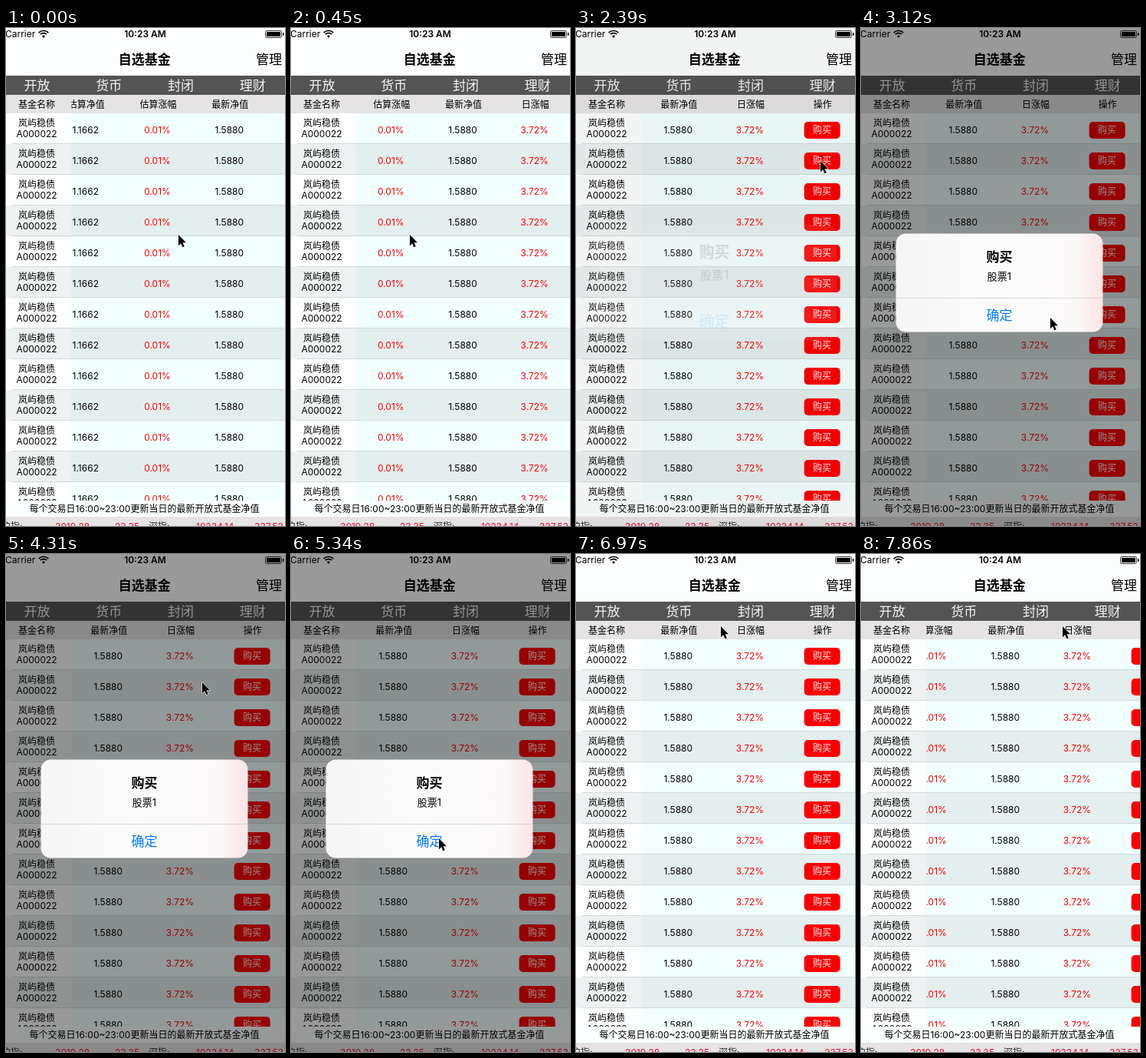
These frames come from a looping animation (364 px wide and 648 px high, 8000 ms). An HTML page:

```html
<!DOCTYPE html>
<html lang="zh-CN">
<head>
<meta charset="utf-8">
<title>自选基金</title>
<style>
  html, body { margin: 0; width: 100%; height: 100%; overflow: hidden; background: #fcfefd; }
  svg { display: block; width: 364px; height: 648px; }
  text { font-family: Inter, "Noto Sans CJK SC", "Noto Sans CJK", sans-serif; }
</style>
</head>
<body>
<svg id="stage" viewBox="0 0 364 648"></svg>
<script>
const LOOP = 8000;
const ROWS = 13, ROW_H = 40, TOP = 111, BOTTOM = 615, SPLIT = 85;
const COL = 93.75;
const colX = i => 40.4 + i * COL;

const rect = (x, y, w, h, fill, extra = '') =>
  `<rect x="${x}" y="${y}" width="${w}" height="${h}" fill="${fill}" ${extra}/>`;

// y is the optical middle of the line
const label = (str, x, y, { size = 12, fill = '#000', anchor = 'middle', weight = 400, id = '' } = {}) =>
  `<text ${id && `id="${id}"`} x="${x}" y="${y + size * 0.37}" font-size="${size}" fill="${fill}" ` +
  `text-anchor="${anchor}" font-weight="${weight}">${str}</text>`;

const rows = draw => Array.from({ length: ROWS }, (_, i) => draw(TOP + i * ROW_H, i % 2)).join('');

function statusBar() {
  const wifi = [3, 6.2, 9.4].map((r, i) => {
    const d = r * 0.68;
    return i
      ? `<path d="M${49 - d} ${12.4 - d}A${r} ${r} 0 0 1 ${49 + d} ${12.4 - d}" fill="none" stroke="#000" stroke-width="1.7"/>`
      : `<path d="M49 13L${49 - d} ${12.4 - d}A${r} ${r} 0 0 1 ${49 + d} ${12.4 - d}Z"/>`;
  }).join('');
  return label('Carrier', -1, 8, { anchor: 'start' }) + wifi +
    label('10:23 AM', 181.5, 8, { weight: 600, id: 'clock' }) +
    rect(338.5, 3.5, 21, 9, 'none', 'rx="2" stroke="#000" stroke-width=".8"') +
    rect(340, 5, 18, 6, '#000', 'rx=".8"') +
    rect(361, 6, 1.5, 4, '#000', 'rx=".7"');
}

function page() {
  const tabs = ['开放', '货币', '封闭', '理财']
    .map((s, i) => label(s, colX(i), 75, { size: 17, fill: '#f4f4f4' })).join('');
  const heads = ['估算净值', '估算涨幅', '最新净值', '日涨幅', '操作']
    .map((s, i) => label(s, colX(i - 1), 100)).join('');
  const cells = rows(y =>
    [['1.1662'], ['0.01%', '#f00'], ['1.5880'], ['3.72%', '#f00']]
      .map(([s, fill]) => [s, fill || '#000'])
      .map(([s, fill], i) => label(s, colX(i - 1) - 0.9, y + 22, { fill })).join('') +
    rect(colX(3) - 24, y + 11, 47, 22, '#fb0000', 'rx="5"') +
    label('购买', colX(3) - 0.6, y + 22, { fill: '#fff0f0' }));

  const ticker = [['沪指:', -6], ['3019.28', 64, 1], ['23.35', 142, 1],
    ['深指:', 186], ['10234.14', 248, 1], ['337.53', 324, 1]]
    .map(([s, x, up]) => label(s, x, 648.5, { anchor: 'start', fill: up ? '#e8102c' : '#222' })).join('');

  return rect(0, 0, 364, 648, '#fcfefd') + statusBar() +
    label('自选基金', 180.7, 41, { size: 17, weight: 600 }) +
    label('管理', 343, 41, { size: 17 }) +
    rect(0, 62, 364, 25, '#545454') + tabs +
    rect(0, 87, 364, 24, '#e5e3e4') +
    `<g clip-path="url(#table)">` +
      rows((y, odd) =>
        rect(0, y, SPLIT, ROW_H, odd ? '#edf1f1' : '#fdfefe') +
        rect(SPLIT, y, 364, ROW_H, odd ? '#e3eeee' : '#f1ffff') +
        rect(8, y + 39, 356, 1, '#d0d9d9') +
        label('岚屿稳债', 40, y + 13) + label('A000022', 40, y + 27)) +
    `</g>` +
    label('基金名称', 40, 100) +
    `<g clip-path="url(#columns)"><g id="scroll">${heads}${cells}</g></g>` +
    rect(0, BOTTOM, 364, 21, '#fafefd') +
    label('每个交易日16:00~23:00更新当日的最新开放式基金净值', 180.5, 626) +
    rect(0, 636, 364, 12, '#e5e3e4') + ticker;
}

const alertBox = () =>
  rect(45.5, 267.5, 270, 128, 'url(#glass)', 'rx="13"') +
  label('购买', 180.5, 298, { size: 17, weight: 600 }) +
  label('股票1', 180.5, 323, { size: 13 }) +
  rect(45.5, 351, 270, 0.7, '#cacacc') +
  label('确定', 180.5, 374, { size: 17, fill: '#007aff' });

const stage = document.getElementById('stage');
stage.innerHTML = `
  <defs>
    <clipPath id="table">${rect(0, TOP, 364, BOTTOM - TOP, '#000')}</clipPath>
    <clipPath id="columns">${rect(SPLIT + 0.5, 87, 364, BOTTOM - 87, '#000')}</clipPath>
    <linearGradient id="glass">
      <stop offset="0" stop-color="#f6f6f6"/><stop offset=".45" stop-color="#fbfbfb"/>
      <stop offset=".88" stop-color="#fbf8f8"/><stop offset=".95" stop-color="#fbe9eb"/>
      <stop offset="1" stop-color="#fae6e8"/>
    </linearGradient>
  </defs>
  ${page()}
  <rect id="dim" width="364" height="648"/>
  <g id="alert">${alertBox()}</g>
  <path id="cursor" d="M1 1V15.2L4.2 12.2L6.4 17.3L8.8 16.2L6.6 11.3H11Z"
    stroke="#fff" stroke-width="1.1" paint-order="stroke" stroke-linejoin="round"/>`;
const [clock, scroll, dim, alertEl, cursor] =
  ['clock', 'scroll', 'dim', 'alert', 'cursor'].map(id => document.getElementById(id));

// The picture only changes on these beats: first, last, count
const beats = [0];
for (const [from, to, n] of [[150, 1050, 7], [1200, 2090, 7], [2390, 3120, 6], [3720, 4750, 8],
  [4900, 5340, 4], [5630, 6670, 8], [6970, 7860, 7]])
  for (let i = 0; i < n; i++) beats.push(Math.round(from + (to - from) * i / (n - 1)));

// Tracks: time, then values
const pointer = [
  [0, 224, 268], [900, 83, 268], [1050, 54, 268], [1200, 36, 269], [1350, 48, 264],
  [1940, 302, 178], [2090, 318, 172], [2390, 318, 172], [2536, 314, 184], [2974, 255, 365],
  [3120, 246, 376], [3720, 236, 379], [3867, 216, 350], [4014, 212, 280], [4161, 226, 205],
  [4309, 255, 166], [4456, 282, 185], [4603, 288, 250], [4750, 270, 324], [4900, 252, 345],
  [5193, 203, 367], [5340, 192, 369], [5630, 192, 369], [5778, 192, 360], [6373, 189, 130],
  [6670, 188, 96], [6970, 188, 93], [7267, 202, 93], [7860, 262, 93]];
const shift = [[0, 158], [900, 23.5], [1050, 0], [7118, 0], [7267, 3], [7860, 55]];
const popup = [[2090, 0, 1.2], [2390, 0.1, 1.18], [2536, 0.85, 1.03], [2682, 1, 1],
  [5340, 1, 1], [5630, 0.5, 1], [5779, 0.08, 1], [5927, 0, 1]];

function sample(track, t) {
  const i = track.findIndex(key => key[0] > t);
  if (i < 0) return track[track.length - 1].slice(1);
  if (i === 0) return track[0].slice(1);
  const a = track[i - 1], b = track[i], k = (t - a[0]) / (b[0] - a[0]);
  return a.slice(1).map((v, j) => v + (b[j + 1] - v) * k);
}

function render(time) {
  const t = beats.filter(b => b <= time).pop();
  const [x, y] = sample(pointer, t);
  const [opacity, scale] = sample(popup, t);
  cursor.setAttribute('transform', `translate(${Math.round(x)} ${Math.round(y)})`);
  scroll.setAttribute('transform', `translate(${sample(shift, t)[0]} 0)`);
  dim.setAttribute('opacity', 0.4 * opacity);
  alertEl.setAttribute('opacity', opacity);
  alertEl.setAttribute('transform', `translate(180.5 331.5) scale(${scale}) translate(-180.5 -331.5)`);
  clock.textContent = t >= 7400 ? '10:24 AM' : '10:23 AM';
}

const start = performance.now();
function tick() {
  render((performance.now() - start) % LOOP);
  requestAnimationFrame(tick);
}
tick();
</script>
</body>
</html>
```
